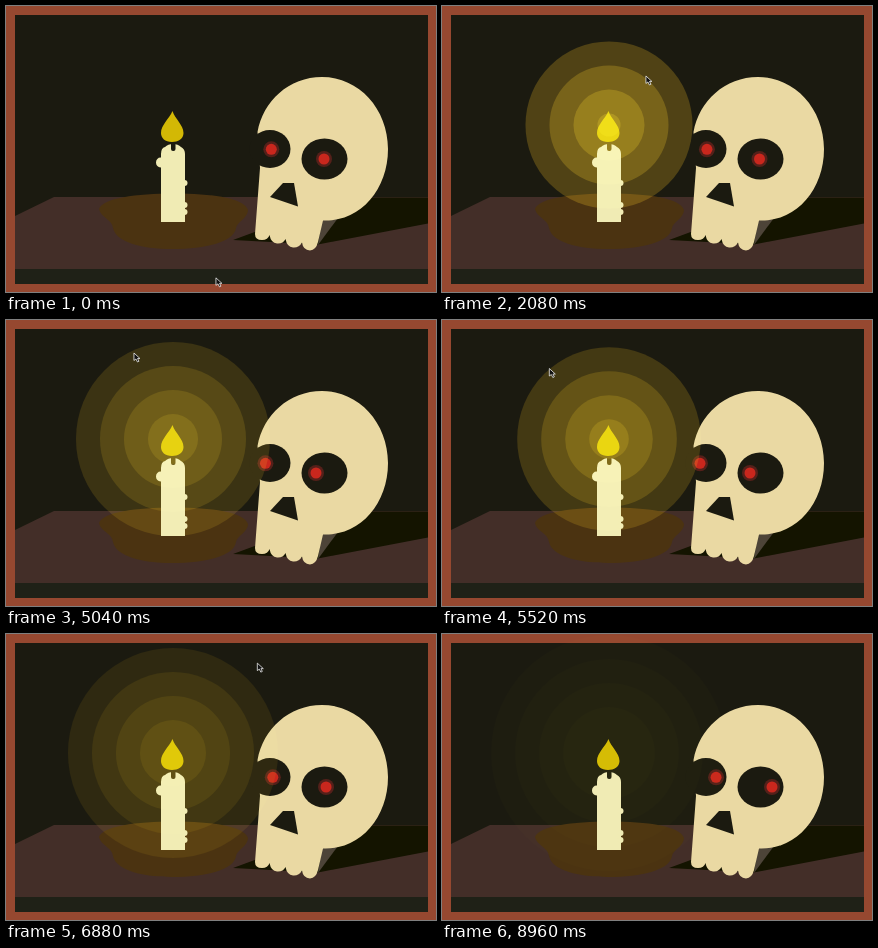
Write an HTML page without scripts that moves like this. It is 430 by 286 pixels and loops after 9360 ms.

```html
<!DOCTYPE html>
<html lang="en">
<head>
<meta charset="utf-8">
<title>Candle and skull</title>
<style>
@property --x { syntax: "<number>"; inherits: true; initial-value: 210; }
@property --y { syntax: "<number>"; inherits: true; initial-value: 272; }
@property --look { syntax: "<number>"; inherits: true; initial-value: 0; }
@property --glow { syntax: "<number>"; inherits: true; initial-value: 130; }

html, body { margin: 0; width: 100%; height: 100%; overflow: hidden; background: #964830; }
svg { display: block; width: 100vw; height: 100vh; animation: scene 9360ms linear infinite; }

.dark { fill: #1b1a10; }
.bone { fill: #ead9a3; }
.wax { fill: #f0ebb4; }

.glow { animation: lit 9360ms step-end infinite; }
.glow circle {
  r: max(0px, calc((var(--glow) - 24 * var(--k)) * 1px));
  fill: rgb(255, 194, 22);
  fill-opacity: max(.01, calc((117.5 - var(--glow)) * .0068));
  mix-blend-mode: screen;
}
.pupil { transform: translateX(calc(var(--look) * var(--reach) * 1px)); }
.cursor { transform: translate(calc(var(--x) * 1px), calc(var(--y) * 1px)); }

/* pointer position, gaze and glow radius */
@keyframes scene {
  0% { --x: 210; --y: 272; --look: 0; --glow: 130; }
  4.27% { --x: 190; --y: 215; --look: -1.5; }
  6.84% { --x: 165; --y: 150; --look: -4; --glow: 46; }
  10.26% { --x: 160; --y: 125; --look: -5; --glow: 44; }
  15.38% { --x: 150; --y: 95; --look: -5; --glow: 62; }
  20.51% { --x: 198; --y: 72; --look: -1; --glow: 80; }
  22.22% { --x: 204; --y: 70; --look: -.5; --glow: 83.5; }
  27.35% { --x: 175; --y: 52; --look: -3; --glow: 88; }
  30.77% { --x: 140; --y: 60; --look: -7; --glow: 85; }
  38.46% { --x: 99; --y: 79; --look: -11.5; --glow: 82; }
  40.17% { --x: 62; --y: 88; --look: -12; --glow: 77; }
  41.88% { --x: 110; --y: 95; --look: -9; --glow: 71; }
  44.44%, 45.3% { --x: 387; --y: 130; --look: 12; --glow: 60; }
  46.15% { --x: 384; --y: 120; --look: 12; --glow: 72; }
  49.57% { --x: 250; --y: 60; --look: 3; --glow: 104; }
  53.85% { --x: 128; --y: 33; --look: -8; --glow: 97; }
  56.41% { --x: 105; --y: 30; --look: -10; --glow: 102; }
  61.97% { --x: 110; --y: 70; --look: -10; --glow: 80; }
  67.52% { --x: 125; --y: 100; --look: -7; --glow: 48; }
  73.5% { --x: 251; --y: 29; --look: 2; --glow: 105; }
  76.92% { --x: 325; --y: 60; --look: 12; --glow: 114; }
  81.2%, 83.76% { --x: 170; --y: 118; --look: -4; --glow: 58; }
  85.47%, 92.31% { --x: 160; --y: 122; --look: -5; --glow: 50; }
  95.73%, 100% { --x: 330; --y: -14; --look: 12; --glow: 118; }
}
@keyframes lit {
  0% { visibility: hidden; }
  6.84%, 100% { visibility: visible; }
}
</style>
</head>
<body>
<svg viewBox="0 0 430 286">
  <defs>
    <g id="ember">
      <circle r="8" fill="#55201a"/>
      <circle r="5.5" fill="#c9271d"/>
    </g>
  </defs>

  <rect width="430" height="286" fill="#964830"/>
  <rect class="dark" x="9" y="9" width="413" height="269"/>

  <!-- table -->
  <path fill="#432e28" d="M9 210L48 191H422V263H9Z"/>
  <rect x="9" y="263" width="413" height="15" fill="#1f2117"/>
  <path fill="#141400" d="M300 191.500H422V217.500L312 238.500L227 234L250 225.500Z"/>
  <path fill="#4d4438" d="M316 212L332 212L312 239Z"/>

  <!-- saucer -->
  <path fill="#4b3311" d="M93 203C97 192 130 187.500 168 187.500C205 187.500 238 192 242 204C242 212 231 216 230 222C228 236 200 243 166 243C135 243 110 236 107 222C106 213 95 212 93 203Z"/>

  <!-- candle -->
  <g class="wax">
    <path d="M155 148Q155 142 159 141Q162 138 167 138Q172 138 175 141Q179 143 179 148V216H155Z"/>
    <ellipse cx="154.500" cy="156.500" rx="4.500" ry="5"/>
    <circle cx="178.500" cy="177" r="3"/>
    <circle cx="178.500" cy="199" r="3"/>
    <circle cx="178.500" cy="206" r="3"/>
  </g>
  <rect class="dark" x="165" y="134" width="4.500" height="11" rx="2"/>
  <path fill="#d3b805" d="M166.500 105C169 113 177.500 119 177.500 127C177.500 133 172 136 166 136C159 136 155 132 155 127C155 119 163 113 166.500 105Z"/>

  <!-- skull -->
  <path class="bone" d="M254 162L249 228Q249 234 256 234Q262 234 263.500 229Q265 237 271 237.500Q277 238 279.500 233Q281 241 287 241.500Q293 242 296 236.500Q297 244 304 244.500Q310 244 312 236L317 214.500C354 216 382 184 382 143C382 103 353 71 316 71C283 71 257 95 251.500 126Z"/>
  <ellipse class="dark" cx="264" cy="143" rx="20.500" ry="19"/>
  <ellipse class="dark" cx="318.500" cy="153" rx="23" ry="20.500"/>
  <path class="dark" d="M277 177H288L292 200.500L264 191Z"/>
  <g class="pupil" style="--reach:.73"><use href="#ember" x="265.300" y="143.300"/></g>
  <g class="pupil" style="--reach:1"><use href="#ember" x="318" y="153"/></g>

  <g class="glow">
    <circle cx="167" cy="119" style="--k:0"/>
    <circle cx="167" cy="119" style="--k:1"/>
    <circle cx="167" cy="119" style="--k:2"/>
    <circle cx="167" cy="119" style="--k:3"/>
  </g>

  <path class="cursor" fill="#111" stroke="#eee" stroke-width=".8" d="M0 0V7.500L2 6L3.500 9L5 8.300L3.600 5.500H6Z"/>
</svg>
</body>
</html>
```
